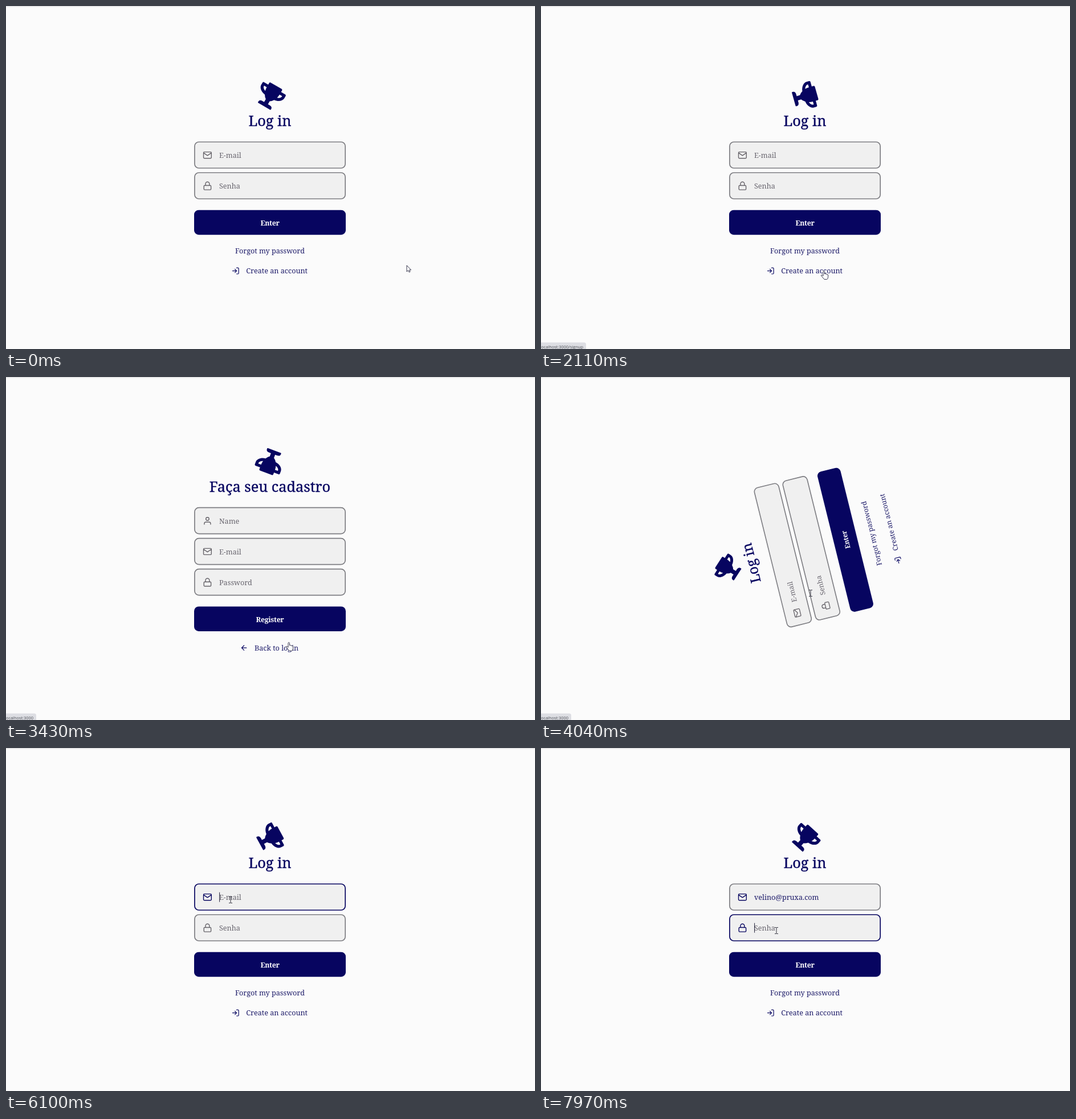
An HTML page for the animation above (8000 ms loop, 928x603 px).

```html
<!DOCTYPE html>
<html lang="en">
<head>
<meta charset="utf-8">
<title>Log in</title>
<style>
  html, body { margin: 0; width: 100%; height: 100%; overflow: hidden; background: #fbfbfb; }
  svg { display: block; width: 100%; height: 100%; }
  text { font: 12.6px "Noto Serif", serif; fill: #69666f; }
  .title { font-size: 25.3px; font-weight: 500; fill: #070560; stroke: #070560; stroke-width: .35; }
  .strong { font-size: 12.3px; font-weight: 700; letter-spacing: -.3px; fill: #fff; }
  .link, .value { fill: #1d1b69; }
  .status { font: 7.4px "Open Sans", sans-serif; fill: #4c4f56; }
  .box { fill: #f0f0f0; stroke: #7d7d82; stroke-width: 1.7; }
  .icon { fill: none; stroke: #666369; stroke-width: 2; stroke-linecap: round; stroke-linejoin: round; }
  .navy { stroke: #070560; }
  .pointer { fill: #fff; stroke: #22223a; stroke-width: .9; stroke-linejoin: round; }
  .beam { fill: none; stroke: #33333f; stroke-width: 1; }
</style>
</head>
<body>
<svg id="stage" viewBox="0 0 928 603"></svg>
<script>
const LOOP = 8000, CX = 463, CY = 303.8, NAVY = '#070560';
const SIGNUP_AT = 2277, LOGIN_AT = 3814;
const EMAIL_FOCUS = 4560, FILLED = 6320, PASS_FOCUS = 6680;

const icons = {
  mail: 'M4 4H20Q22 4 22 6V18Q22 20 20 20H4Q2 20 2 18V6Q2 4 4 4ZM22 6L12 13L2 6',
  lock: 'M5 11H19Q21 11 21 13V20Q21 22 19 22H5Q3 22 3 20V13Q3 11 5 11ZM7 11V7A5 5 0 0 1 17 7V11',
  user: 'M20 21V19A4 4 0 0 0 16 15H8A4 4 0 0 0 4 19V21M8 7A4 4 0 1 0 16 7A4 4 0 1 0 8 7',
  enter: 'M15 3H19Q21 3 21 5V19Q21 21 19 21H15M10 17L15 12L10 7M15 12H3',
  back: 'M19 12H5M12 19L5 12L12 5'
};

const trophyPath = 'M128 64V24Q128 0 152 0H424Q448 0 448 24V64H552Q576 64 576 88V144' +
  'C576 215 495 277 404 286Q372 338 336 360V432H384Q448 436 448 488V500Q448 512 436 512' +
  'H140Q128 512 128 500V488Q128 436 192 432H240V360Q204 338 172 286C81 277 0 215 0 144V88Q0 64 24 64Z' +
  'M64 128V144C64 165 95 199 141 214Q130 176 128 128ZM512 128V144C512 165 481 199 435 214Q446 176 448 128Z';

const icon = (name, x, y, size, cls = '') =>
  `<path class="icon ${cls}" d="${icons[name]}" transform="translate(${x} ${y}) scale(${size}) translate(-12 -12)"/>`;

const label = (x, y, str, cls = '', anchor = 'start') =>
  `<text class="${cls}" x="${x}" y="${y}" text-anchor="${anchor}">${str}</text>`;

const field = (id, y, name, hint) => `<g id="${id}">
  <rect class="box" x="330.9" y="${y + .8}" width="264.3" height="46" rx="7.6"/>
  ${icon(name, 353.4, y + 24, .69)}
  ${label(374, y + 28.6, hint, 'hint')}
  <path class="caret" d="M374.6 ${y + 15.5}v17" stroke="#22223a" stroke-width="1" visibility="hidden"/></g>`;

const button = (y, str) =>
  `<rect x="330" y="${y}" width="266" height="43.5" rx="8" fill="${NAVY}"/>` +
  label(CX, y + 27.2, str, 'strong', 'middle');

const page = (id, top, title, rest) => `<g id="${id}">
  <g class="trophy" data-y="${top}"><path d="${trophyPath}" fill="${NAVY}" fill-rule="evenodd"
    transform="scale(.0815) translate(-288 -256)"/></g>
  ${label(CX, top + 52.7, title, 'title', 'middle')}${rest}</g>`;

const stage = document.getElementById('stage');
stage.innerHTML = `
  <rect width="928" height="603" fill="#fbfbfb"/>
  <rect width="928" height="1.5" fill="#e2e2e3"/>` +
  page('login', 158.3, 'Log in',
    field('email', 238.2, 'mail', 'E-mail') +
    label(374, 266.8, 'velino@pruxa.com', 'value') +
    field('pass', 292.2, 'lock', 'Senha') +
    button(358.7, 'Enter') +
    label(CX, 434.5, 'Forgot my password', 'link', 'middle') +
    icon('enter', 402.8, 465.7, .59, 'navy') +
    label(421.3, 470.4, 'Create an account', 'link')) +
  page('signup', 148.8, 'Faça seu cadastro',
    field('newName', 228.9, 'user', 'Name') +
    field('newEmail', 282.9, 'mail', 'E-mail') +
    field('newPass', 336.9, 'lock', 'Password') +
    button(403.4, 'Register') +
    icon('back', 417.6, 476.2, .6, 'navy') +
    label(436, 480.8, 'Back to login', 'link')) +
  `<g id="status">
    <path fill="#dddee3" d="M0 591.5H0V603H79V595Q79 591.5 75.5 591.5Z"/>
    <text class="status" y="601.5" text-anchor="end"></text>
  </g>
  <g id="cursor">
    <path class="pointer" d="M0 0V11L2.6 8.8L4.2 12L6 11.2L4.5 8H7.6Z"/>
    <path class="pointer" d="M0 1.5Q1.3 -.4 2.4 1.5V6Q4 4.6 4.9 6.4Q6.4 5.4 7 7Q8.4 6.4 8.6 8V11.5Q8 15.5 6.6 15.5H2Q-1 12 -3.6 8.8Q-3.4 7.2 -1.8 7.8L0 9.4Z"/>
    <path class="beam" d="M-3 -5.5H-.8L0 -4.8L.8 -5.5H3M0 -4.8V4.8M-3 5.5H-.8L0 4.8L.8 5.5H3"/>
  </g>`;

const $ = sel => stage.querySelector(sel);
const show = (el, on) => el.setAttribute('visibility', on ? 'visible' : 'hidden');
const display = (el, on) => { el.style.display = on ? '' : 'none'; };
const clamp = v => Math.max(0, Math.min(1, v));
const smooth = v => v * v * (3 - 2 * v);

// cubic-bezier(.25, .1, .25, 1)
function ease(x) {
  if (x <= 0 || x >= 1) return clamp(x);
  const curve = (a, b, u) => 3 * a * u * (1 - u) ** 2 + 3 * b * u * u * (1 - u) + u ** 3;
  let lo = 0, hi = 1;
  for (let i = 0; i < 24; i++) {
    const mid = (lo + hi) / 2;
    if (curve(.25, .25, mid) < x) lo = mid; else hi = mid;
  }
  return curve(.1, 1, lo);
}

// time, x, y of the pointer's hot spot
const path = [
  [0, 703, 456], [120, 703, 456], [500, 640, 453], [810, 576, 454], [1350, 496, 465], [1700, 495, 465],
  [3830, 495, 466], [4040, 473, 380], [4480, 394, 267], [6430, 394, 267],
  [6660, 407, 317], [7050, 413, 321], [LOOP, 413, 321]
];

function pointerAt(t) {
  const i = path.findIndex(k => k[0] > t);
  const [a, b] = [path[i - 1], path[i]];
  const p = (t - a[0]) / (b[0] - a[0]);
  const k = i > 1 && i < 5 ? p : smooth(p);
  return [a[1] + (b[1] - a[1]) * k, a[2] + (b[2] - a[2]) * k];
}

function pointerShape(t) {
  if (t < 1130) return 0;
  if (t < SIGNUP_AT) return 1;
  if (t < 3000) return 0;
  if (t < LOGIN_AT) return 1;
  return t < 3960 ? 0 : 2;
}

function trophyAngle(t) {
  if (t < SIGNUP_AT) return 30 + .1915 * t;
  return .182 * (t - (t < LOGIN_AT ? 2329 : 3785));
}

function setField(id, focused, active, since, filled, t) {
  const g = $('#' + id);
  g.querySelector('.box').style.stroke = focused ? NAVY : '';
  g.querySelector('.icon').classList.toggle('navy', active);
  show(g.querySelector('.hint'), !filled);
  show(g.querySelector('.caret'), focused && !filled && Math.floor((t - since) / 530) % 2 === 0);
}

function setStatus(t) {
  const first = t < 2900;
  const [from, to] = first ? [1130, 2700] : [3050, 4290];
  const alpha = Math.min(clamp((t - from) / 120), clamp((to + 150 - t) / 150));
  const right = first ? 74 : 48;
  const [bubble, text] = $('#status').children;
  $('#status').setAttribute('opacity', alpha);
  bubble.setAttribute('d', `M0 591.5H${right + 1.5}Q${right + 5} 591.5 ${right + 5} 595V603H0Z`);
  text.setAttribute('x', right);
  text.textContent = first ? 'localhost:3000/signup' : 'localhost:3000';
}

function render(t) {
  const onSignup = t >= SIGNUP_AT && t < LOGIN_AT;
  display($('#login'), !onSignup);
  display($('#signup'), onSignup);

  const form = $(onSignup ? '#signup' : '#login');
  const left = t < SIGNUP_AT ? 0 : 1 - ease((t - (onSignup ? SIGNUP_AT : LOGIN_AT)) / 800);
  form.setAttribute('transform',
    `translate(${CX} ${CY}) rotate(${-200 * left}) scale(${1 - .09 * left}) translate(${-CX} ${-CY})`);
  const trophy = form.querySelector('.trophy');
  trophy.setAttribute('transform', `translate(463.4 ${trophy.dataset.y}) rotate(${trophyAngle(t)})`);

  const filled = t >= FILLED;
  setField('email', t >= EMAIL_FOCUS && t < PASS_FOCUS, t >= EMAIL_FOCUS, EMAIL_FOCUS, filled, t);
  setField('pass', t >= PASS_FOCUS, t >= PASS_FOCUS, PASS_FOCUS, false, t);
  show($('.value'), filled && !onSignup);

  setStatus(t);
  const cursor = $('#cursor'), shape = pointerShape(t);
  cursor.setAttribute('transform', `translate(${pointerAt(t)})`);
  [...cursor.children].forEach((el, i) => show(el, i === shape));
}

const start = performance.now();
function tick() {
  render((performance.now() - start) % LOOP);
  requestAnimationFrame(tick);
}
tick();
</script>
</body>
</html>
```
